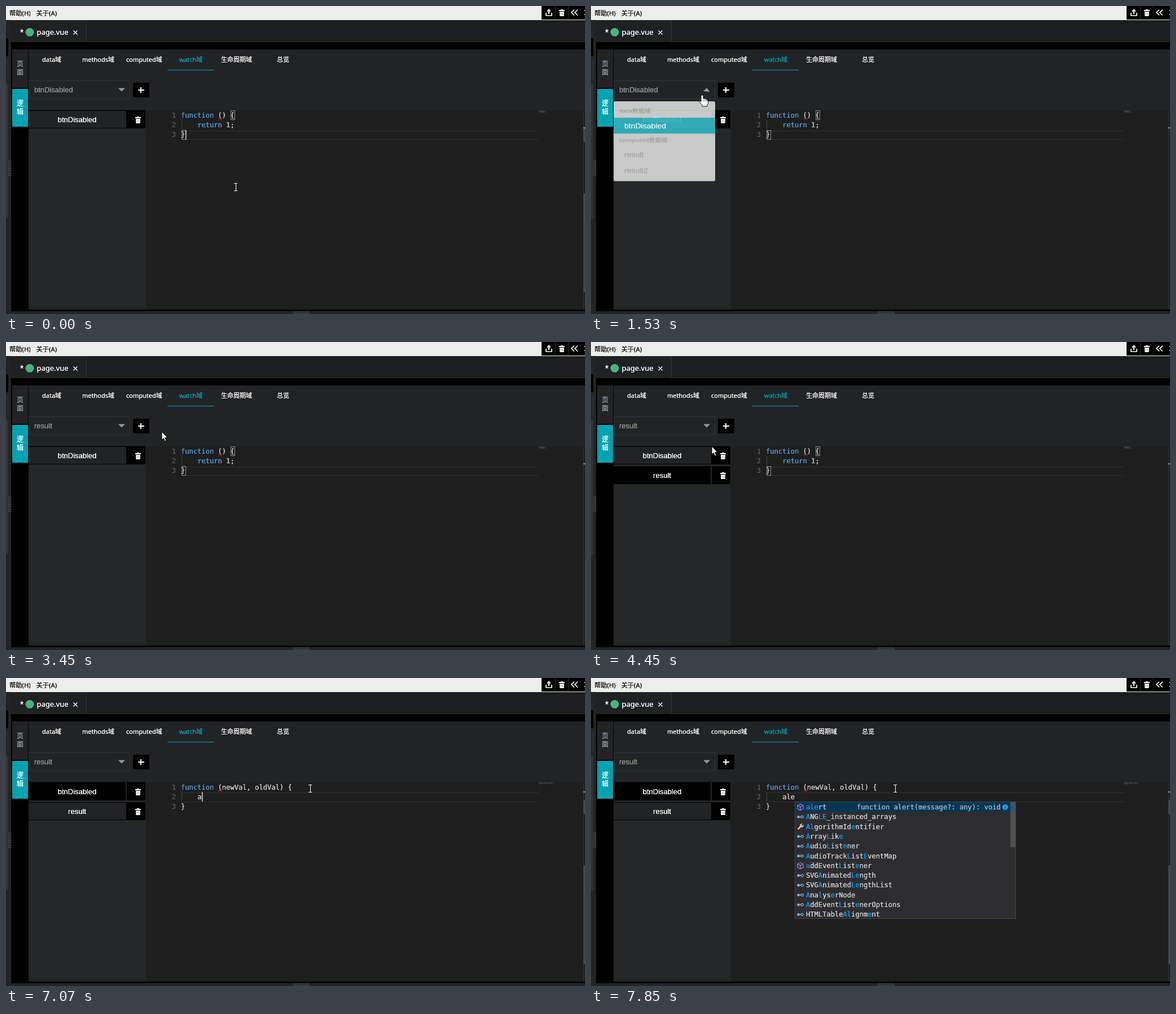
An HTML page with a canvas that plays this animation: 1026 by 546 pixels, repeating every 8 s.

```html
<!DOCTYPE html>
<html lang="zh">
<head>
<meta charset="utf-8">
<style>
html, body { margin: 0; width: 100%; height: 100%; overflow: hidden; background: #000; }
canvas { display: block; }
</style>
</head>
<body>
<canvas id="stage" width="1026" height="546"></canvas>
<script>
const g = document.getElementById('stage').getContext('2d');
const UI = '"Noto Sans", "Noto Sans CJK SC", "Noto Sans CJK JP", sans-serif';
const ARIAL = '"Liberation Sans", Arial, sans-serif';
const MONO = '12.1px "DejaVu Sans Mono", monospace';
const PANEL = '#222325', TEAL = '#00a3b0', EDITOR = '#1e1e1e';
const CH = 7.284, LINE = 17.3, CODE_X = 310;

// Times of the actions, in ms
const OPEN = 1290, PICK = 2260, ADD = 3870, SELECT = 4650, CHECK = 5300,
      CLICK = 5600, ENTER = 6550, TYPED = [7070, 7180, 7310], SUGGEST = 7430;

// Pointer hot spot: time, x, y
const PATH = [
  [240, 407, 321], [480, 372, 225], [620, 335, 140], [740, 296, 92], [990, 216, 145],
  [1080, 216, 145], [1220, 209, 142], [1450, 209, 142], [1830, 152, 215], [1890, 135, 281],
  [3010, 135, 281], [3430, 276, 159], [3500, 276, 159], [3690, 237, 142], [4330, 237, 142],
  [4580, 190, 230], [4720, 190, 230], [5100, 406, 229], [5170, 406, 229], [5560, 540, 196],
  [5800, 540, 196], [5810, 539, 196]
];

const SUGGESTIONS = [
  ['m', '[ale]rt'], ['i', '[A]NG[LE]_instanced_arrays'], ['w', '[Al]gorithmId[e]ntifier'],
  ['i', '[A]rray[L]ik[e]'], ['i', '[A]udio[L]ist[e]ner'], ['i', '[A]udioTrack[L]ist[E]ventMap'],
  ['m', '[a]ddEvent[L]ist[e]ner'], ['i', 'SVG[A]nimated[Le]ngth'], ['i', 'SVG[A]nimated[Le]ngthList'],
  ['i', '[A]na[l]ys[e]rNode'], ['i', '[A]ddEvent[L]ist[e]nerOptions'], ['i', 'HTMLTable[Al]ignm[e]nt']
];

const ramp = (t, a, b) => Math.max(0, Math.min(1, (t - a) / (b - a)));
const ease = k => 1 - (1 - k) ** 2;

function rect(color, x, y, w, h) {
  g.fillStyle = color;
  g.fillRect(x, y, w, h);
}
function frame(color, x, y, w, h) {
  g.strokeStyle = color;
  g.lineWidth = 1;
  g.strokeRect(x + .5, y + .5, w - 1, h - 1);
}
function text(s, x, y, font, color, align = 'left') {
  g.font = font;
  g.fillStyle = color;
  g.textAlign = align;
  // The second pass gives the denser edges of hinted screen text
  g.fillText(s, x, y);
  g.fillText(s, x, y);
}
function shape(points, fill, stroke, width = 1, close = true) {
  g.beginPath();
  for (let i = 0; i < points.length; i += 2) g.lineTo(points[i], points[i + 1]);
  if (close) g.closePath();
  if (fill) { g.fillStyle = fill; g.fill(); }
  if (stroke) { g.strokeStyle = stroke; g.lineWidth = width; g.stroke(); }
}
const line = (points, color, width) => shape(points, null, color, width, false);
function circle(x, y, r, fill, stroke) {
  g.beginPath();
  g.arc(x, y, r, 0, 7);
  if (fill) { g.fillStyle = fill; g.fill(); }
  if (stroke) { g.strokeStyle = stroke; g.lineWidth = 1.2; g.stroke(); }
}
function at(x, y, draw) {
  g.save();
  g.translate(x, y);
  draw();
  g.restore();
}

function trash(x, y) {
  at(x, y, () => {
    rect('#fff', -2, -6, 4, 1);
    rect('#fff', -5, -5, 10, 2);
    shape([-4, -2, 4, -2, 3.6, 6, -3.6, 6], '#fff');
    rect('#999', -2, 0, 1, 4);
    rect('#999', 1, 0, 1, 4);
  });
}

function topBar() {
  rect('#ededed', 0, 0, 1026, 25);
  text('帮助(H)', 6, 17, '11.3px ' + UI, '#111');
  text('关于(A)', 53.5, 17, '11.3px ' + UI, '#111');
  rect('#000', 949, 0, 77, 24);
  rect('#26282a', 973, 0, 1, 24);
  rect('#26282a', 996, 0, 1, 24);
  line([957, 12, 957, 17, 967, 17, 967, 12], '#fff', 1.7);
  line([962, 14, 962, 8], '#fff', 2);
  shape([958, 9.5, 962, 5, 966, 9.5], '#fff');
  trash(985, 12);
  for (const x of [1007, 1013]) line([x, 6.5, x - 5, 11.5, x, 16.5], '#fff', 1.7);
  rect('#fff', 1025, 7, 1, 2);
  rect('#fff', 1025, 14, 1, 2);
}

function shell() {
  rect('#000', 0, 0, 1026, 546);
  topBar();
  rect('#1d1e1f', 9, 25, 1017, 38);
  rect('#2c2e30', 143, 63, 883, 1);
  rect('#202123', 10, 26, 132, 38);
  rect('#303234', 142, 26, 1, 38);
  rect('#232426', 0, 26, 9, 520);
  rect('#000', 0, 57, 4, 32);
  frame('#34363a', -2, 97, 6, 33);
  rect('#303234', 0, 138, 4, 238);
  text('*', 24.5, 51, '13px ' + UI, '#fff');
  circle(42, 46.5, 7.5, '#41b883');
  text('page.vue', 54.5, 51, '13px ' + UI, '#fff');
  line([119.5, 43.5, 126.5, 50.5], '#fff', 1.4);
  line([126.5, 43.5, 119.5, 50.5], '#fff', 1.4);

  rect(PANEL, 11, 77, 28, 68);
  rect(TEAL, 11, 147, 28, 67);
  [['页', 107, '#aaa'], ['面', 122, '#aaa'], ['逻', 177, '#fff'], ['辑', 192, '#fff']]
    .forEach(([s, y, c]) => text(s, 25, y, '12px ' + UI, c, 'center'));

  rect(PANEL, 40, 77, 986, 108);
  [['data域', 64], ['methods域', 135], ['computed域', 213], ['watch域', 306.5], ['生命周期域', 381], ['总览', 480]]
    .forEach(([s, x]) => text(s, x, 99, '500 11px ' + UI, s[0] == 'w' ? TEAL : '#fff'));
  rect(TEAL, 286, 113, 82, 1);

  rect('#252628', 40, 185, 208, 353);
  rect(EDITOR, 248, 185, 778, 353);
  rect('#232426', 9, 541, 1017, 5);
  for (let i = 0; i < 10; i++) {
    for (let j = 0; j < 2; j++) {
      rect('#bbb', 509 + i * 3, 542 + j * 3, 1, 1);
      rect('#bbb', 5 + j * 3, 273 + i * 3, 1, 1);
    }
  }
}

function selectBox(t) {
  frame('#323437', 40, 132, 180, 33);
  text(t < PICK + 60 ? 'btnDisabled' : 'result', 50, 153, '13px ' + ARIAL, '#9a9a9a');
  const turn = ease(ramp(t, OPEN, OPEN + 300)) - ease(ramp(t, PICK + 30, PICK + 330));
  at(205, 148.5, () => {
    g.rotate(-Math.PI * turn);
    shape([-6, -3, 6, -3, 0, 3], '#999');
  });
  rect('#000', 225, 136, 29, 26);
  rect('#fff', 234, 148, 11, 2);
  rect('#fff', 238, 144, 2, 10);
}

function row(label, y, selected, hover) {
  rect('#000', 40, y, selected ? 174 : 172, 32);
  if (hover) rect('#343535', 41, y + 1, 171, 31);
  else if (selected) rect(PANEL, 40, y + 1, 173, 30);
  rect('#000', 214, y, 33, 32);
  text(label, 126, y + 21, '13px ' + ARIAL, '#fff', 'center');
  trash(234, y + 17);
}

function list(t) {
  rect('#111', 40, 184, 207, 1);
  row('btnDisabled', 185, t < SELECT, false);
  g.globalAlpha = ramp(t, ADD - 20, ADD + 170);
  if (g.globalAlpha) row('result', 220, t >= SELECT, t > 4500 && t < 5170);
  g.globalAlpha = 1;
}

function dropdown(t) {
  const k = ramp(t, OPEN + 60, OPEN + 300) * (1 - ramp(t, 2520, 2780));
  if (!k) return;
  at(0, 169, () => {
    g.globalAlpha = k;
    g.scale(1, .4 + .6 * k);
    g.translate(0, -169);
    g.beginPath();
    g.roundRect(40, 169, 180, 166, 3);
    g.fillStyle = '#fff';
    g.fill();
    text('data数据域', 50, 193, '11px ' + UI, '#999');
    text('computed数据域', 50, 253, '11px ' + UI, '#999');
    const active = t < 1870 ? 0 : 1;
    [['btnDisabled', 203], ['result', 263], ['result2', 296]].forEach(([s, y], i) => {
      if (i == active) rect(TEAL, 40, y, 180, 33);
      text(s, 59, y + 22, '14px ' + ARIAL, i == active ? '#fff' : '#a0a0a0');
    });
  });
}

// Everything the code editor shows at time t
function editorState(t) {
  if (t < SELECT) {
    return { lines: ['function () {', '    return 1;', '}'], current: 2, col: 1, boxes: [[12, 0], [0, 2]], caret: t < 500 };
  }
  const head = 'function (newVal, oldVal) {';
  if (t < ENTER) {
    const clicked = t >= CLICK;
    return {
      lines: [head, '}'], current: 0, col: clicked ? head.length : 0,
      boxes: clicked ? [[26, 0], [0, 1]] : [], caret: clicked ? t < 6060 : true
    };
  }
  const n = TYPED.filter(s => t >= s).length;
  const since = t - (n ? TYPED[n - 1] : ENTER);
  return { lines: [head, '    ' + 'ale'.slice(0, n), '}'], current: 1, col: 4 + n, boxes: [], caret: since < 540 };
}

function editor(t) {
  const { lines, current, col, boxes, caret } = editorState(t);
  const top = i => Math.round(185 + i * LINE);
  rect('#303030', 311, top(current) + (current ? 1 : 0), 633, 1);
  rect('#303030', 311, top(current + 1) - 1, 633, 1);
  if (lines.length > 2) rect('#444', 311, top(1), 1, 17);
  for (const [c, l] of boxes) frame('#8a8a8a', Math.round(CODE_X + c * CH + .6), top(l), 8, 17);

  lines.forEach((s, i) => {
    const y = 197.5 + i * LINE;
    text(i + 1, 301, y, MONO, '#5a5a5a', 'right');
    for (const m of s.matchAll(/function|return|\d|[^\s\d]+/g)) {
      const color = /function|return/.test(m[0]) ? '#569cd6' : /\d/.test(m[0]) ? '#b5cea8' : '#d4d4d4';
      text(m[0], CODE_X + m.index * CH, y, MONO, color);
    }
    for (let c = 0; c < s.length; c++) {
      if (s[c] != ' ') rect('rgba(190,200,210,.36)', 944 + c * .95, 185.5 + i * 2, .8, 1.4);
    }
  });

  if (t < SELECT || t > CHECK) line([376, 201, 378, 199, 380, 201, 382, 199, 384, 201], '#e03030', 1);
  if (caret) rect('#d4d4d4', Math.round(CODE_X + col * CH + .4), top(current), 1.5, 17);

  rect('#333', 1023, 185, 1, 353);
  if (t < 240 || t > CHECK) {
    rect('#4a4a4a', 1023, 216, 3, 25);
    rect('#4a4a4a', 1023, 332, 3, 175);
  }
  rect('#999', 1023, [185, 201, 215][current], 3, 2);
}

function suggestionIcon(kind, y) {
  at(371, y, () => {
    if (kind == 'm') {
      shape([0, -5.5, 5, -3, 5, 3, 0, 5.5, -5, 3, -5, -3], null, '#b180d7', 1.2);
      line([-5, -3, 0, -.5, 5, -3], '#b180d7', 1.2);
      line([0, -.5, 0, 5.5], '#b180d7', 1.2);
    } else if (kind == 'i') {
      circle(-3.4, 0, 2.3, '#75beff');
      line([-2, 0, 1, 0], '#75beff', 1.2);
      circle(3.2, 0, 2.1, null, '#75beff');
    } else {
      line([-4.5, 4.5, 1.5, -1.5], '#ccc', 2.6);
      circle(2.4, -2.2, 3.2, '#ccc');
      line([2.4, -2.2, 6, -5.8], '#2d2d30', 2);
    }
  });
}

function suggestions() {
  rect('#2d2d30', 362, 220, 390, 206);
  rect('#073655', 362, 220, 390, 17);
  SUGGESTIONS.forEach(([kind, label], i) => {
    const mid = 229 + i * LINE;
    suggestionIcon(kind, mid);
    let x = 381;
    label.split(/[[\]]/).forEach((part, j) => {
      text(part, x, mid + 4, MONO, j % 2 ? '#0f9bff' : '#d4d4d4');
      x += part.length * CH;
    });
  });
  text('function alert(message?: any): void', 471, 233, MONO, '#a9b8c4');
  circle(734, 229, 5, '#2f9be8');
  rect('#073655', 733.4, 226, 1.3, 1.3);
  rect('#073655', 733.4, 228.2, 1.3, 4);
  rect('rgba(121,121,121,.45)', 743, 220, 9, 80);
  frame('#454548', 361, 219, 392, 208);
}

function pointer(t) {
  let i = PATH.findIndex(p => p[0] > t);
  if (i < 0) i = PATH.length;
  const a = PATH[Math.max(0, i - 1)], b = PATH[Math.min(i, PATH.length - 1)];
  const k = a == b ? 0 : ramp(t, a[0], b[0]);
  const x = a[1] + (b[1] - a[1]) * k, y = a[2] + (b[2] - a[2]) * k;
  const inside = (l, u, r, d) => x >= l && x < r && y >= u && y < d;
  const open = t > OPEN && t < 2780;
  const hand = inside(40, 132, 220, 165) || inside(225, 136, 254, 162) || inside(40, 185, 247, 253) ||
               open && inside(40, 169, 220, 335);
  at(Math.round(x), Math.round(y), () => {
    if (inside(248, 185, 1026, 538)) {
      for (const [color, w] of [['#000', 2.6], ['#fff', 1.2]]) {
        line([-3, -6.5, 3, -6.5], color, w);
        line([.5, -6.5, .5, 6.5], color, w);
        line([-3, 6.5, 3, 6.5], color, w);
      }
    } else if (hand) {
      shape([-2, 1, -1, 0, 1, 0, 2, 1, 2, 6, 4.5, 6, 5.5, 7, 8, 7, 9, 9, 10.5, 9.5, 10.5, 15, 8.5, 18, 8.5, 20,
             0, 20, 0, 18, -5, 12, -5, 10, -3.5, 10, -2, 12], '#fff', '#111', 1);
      for (const lx of [2, 5, 8]) line([lx, 8, lx, 11], '#222', .8);
    } else {
      shape([0, 0, 0, 14.5, 3.3, 11.5, 5.5, 17, 8, 16, 5.7, 10.7, 10.3, 10.5], '#fff', '#000', 1);
    }
  });
}

function draw() {
  const t = performance.now() % 8000;
  shell();
  selectBox(t);
  list(t);
  editor(t);
  dropdown(t);
  if (t >= SUGGEST) suggestions();
  pointer(t);
  requestAnimationFrame(draw);
}
draw();
</script>
</body>
</html>
```
